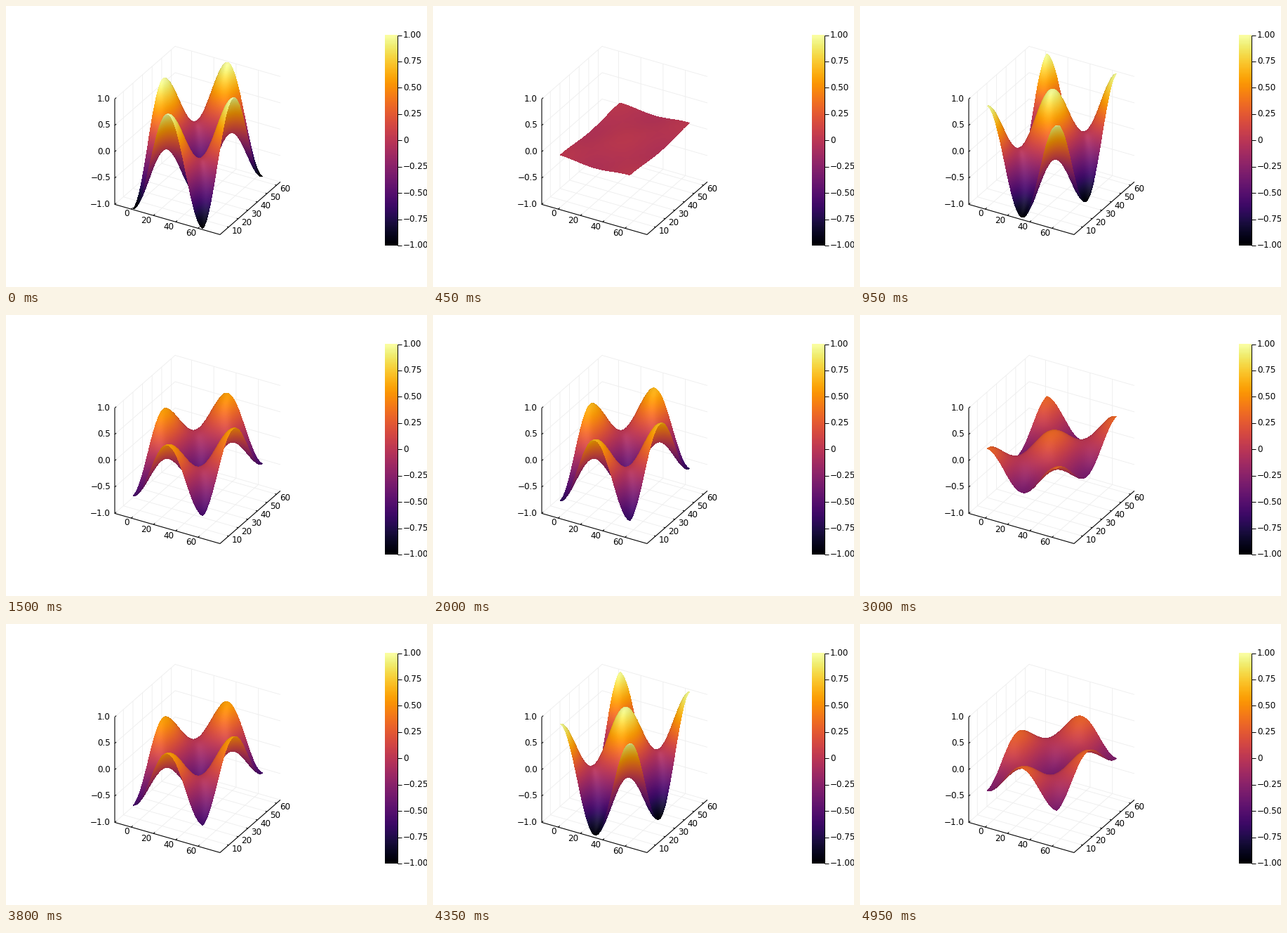
Recreate the animation shown at these times as a matplotlib script. Size 600x400 px, loop 5 s.

```python
import numpy as np
import matplotlib
import matplotlib.pyplot as plt
from matplotlib.animation import FuncAnimation

W, H, DPI = 600, 400, 100
FRAMES, INTERVAL = 100, 50
OMEGA = np.pi * np.sqrt(2) / 25   # phase step of the standing wave
X_MIN, X_SPAN = -14.75, 94.5
Y_MIN, Y_SPAN = 1, 63
FONT = 12 * 72 / DPI              # 12 px text
CMAP = matplotlib.colormaps["inferno"]
VIEW = (0.433, -0.75, 0.5)        # direction towards the viewer
CENTRE = (273.0, 191.4)           # middle of the plot box
SHRINK = 0.989                    # surface size relative to the box

plt.rcParams["font.family"] = "DejaVu Sans"
fig = plt.figure(figsize=(W / DPI, H / DPI), dpi=DPI, facecolor="white")
ax = fig.add_axes([0, 0, 1, 1])
ax.set_axis_off()


def project(a, b, z):
    """Box coordinates (a, b in 0..1, z in -1..1) to stage pixels."""
    return (155 + 150 * a + 86 * b,
            282.4 + 43 * a - 75 * b - 75 * (z + 1))


def line(points, color="black", width=1.0):
    px, py = zip(*points)
    ax.plot(px, py, color=color, lw=width * 72 / DPI, zorder=1,
            solid_capstyle="butt")


def box_line(*corners, **style):
    line([project(*c) for c in corners], **style)


def label(x, y, text, align):
    ax.text(x, y, text.replace("-", "\u2212"), fontsize=FONT, ha=align,
            va="center", zorder=3)


def draw_axes():
    grid = dict(color="#eeeeee", width=0.9)
    x_ticks = [(v, (v - X_MIN) / X_SPAN) for v in range(0, 61, 20)]
    y_ticks = [(v, (v - Y_MIN) / Y_SPAN) for v in range(10, 61, 10)]
    z_ticks = [-1.0, -0.5, 0.0, 0.5, 1.0]

    for _, a in x_ticks:
        box_line((a, 0, -1), (a, 1, -1), (a, 1, 1), **grid)
    for _, b in y_ticks:
        box_line((1, b, -1), (0, b, -1), (0, b, 1), **grid)
    for z in z_ticks:
        box_line((0, 0, z), (0, 1, z), (1, 1, z), **grid)

    box_line((0, 0, 1), (0, 0, -1), (1, 0, -1), (1, 1, -1), width=1.1)

    for v, a in x_ticks:
        box_line((a, 0, -1), (a, 0.025, -1))
        px, py = project(a, 0, -1)
        label(px - 2.8, py + 6.8, str(v), "right")
    for v, b in y_ticks:
        box_line((1, b, -1), (0.985, b, -1))
        px, py = project(1, b, -1)
        label(px + 4.2, py + 5.5, str(v), "left")
    for z in z_ticks:
        box_line((0, 0, z), (0.0, 0.025, z))
        label(149, project(0, 0, z)[1], f"{z:.1f}", "right")


def draw_colorbar():
    left, right, top, bottom = 540, 558, 41.5, 341
    ax.imshow(np.linspace(1, 0, 256)[:, None], cmap=CMAP, aspect="auto",
              extent=(left, right, bottom, top), interpolation="nearest")
    line([(right, top), (right, bottom)])
    for i in range(9):
        value = 1 - i / 4
        y = top + (bottom - top) * i / 8
        line([(right, y), (right + 6, y)])
        label(566, y, f"{value:.2f}" if value else "0", "left")


draw_axes()
draw_colorbar()

# Surface samples, ordered from far to near so that the nearest one wins.
N = 600
u, v = (g.ravel() for g in np.meshgrid(np.linspace(0, 1, N),
                                       np.linspace(0, 1, N)))
near = np.argsort(VIEW[0] * u * 2 / 3 + VIEW[1] * v)
u, v = u[near], v[near]


def angle(t):
    """Wave phase at the centres of 64 cells."""
    return 2 * np.pi * (t * 63 + 0.5) / 64


cu, su = np.cos(angle(u)), np.sin(angle(u))
cv, sv = np.cos(angle(v)), np.sin(angle(v))
mode = cu * cv
base_x, base_y = project(1 / 6 + u * 2 / 3, v, 0)
col = (CENTRE[0] + SHRINK * (base_x - CENTRE[0]) + 0.4).astype(int)
base_y = CENTRE[1] + SHRINK * (base_y - CENTRE[1])
order = np.arange(N * N)


def shade(i, amp):
    """Lit colours of the samples i."""
    rgb = CMAP((amp * mode[i] + 1) / 2)[:, :3]
    zx = -1.5 * np.pi * amp * su[i] * cv[i]
    zy = -np.pi * amp * cu[i] * sv[i]
    facing = (-zx * VIEW[0] - zy * VIEW[1] + VIEW[2]) / np.sqrt(
        zx ** 2 + zy ** 2 + 1)
    lit = np.clip(facing, 0, 1)
    gain = 0.82 + 0.15 * (1 - (1 - lit) ** 3)
    return np.clip(rgb * gain[:, None] + 0.07 * lit[:, None] ** 8, 0, 1)


def render(k):
    amp = -np.cos(OMEGA * k)
    row = (base_y - 75 * SHRINK * amp * mode).astype(int)
    top = np.full(W * H, -1)
    top[row * W + col] = order
    seen = top >= 0
    image = np.zeros((W * H, 4))
    image[seen, :3] = shade(top[seen], amp)
    image[seen, 3] = 1
    return image.reshape(H, W, 4)


surface = ax.imshow(render(0), extent=(0, W, H, 0), aspect="auto",
                    interpolation="nearest", zorder=2)
ax.set_xlim(0, W)
ax.set_ylim(H, 0)


def update(k):
    surface.set_data(render(k))
    return (surface,)


anim = FuncAnimation(fig, update, frames=FRAMES, interval=INTERVAL,
                     init_func=lambda: update(0), repeat=True, repeat_delay=0)
plt.show()
```
